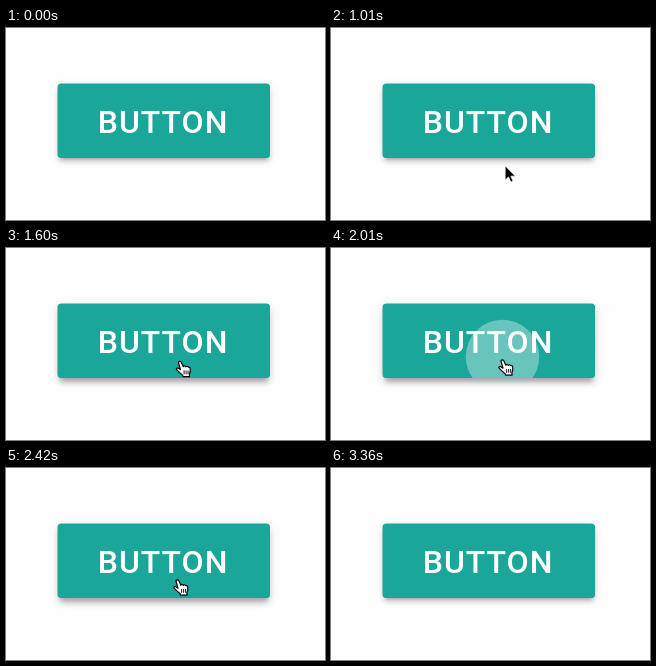
An HTML page that plays this animation: 319 px wide and 192 px high, repeating every 3.83 s.

```html
<!DOCTYPE html>
<html lang="en">
<head>
<meta charset="utf-8">
<title>Button ripple</title>
<style>
html, body { margin: 0; width: 100%; height: 100%; overflow: hidden; background: #fefefe; }
#stage { position: relative; width: 319px; height: 192px; overflow: hidden; }
#shadow { position: absolute; left: 52px; top: 56px; width: 212px; height: 74px; border-radius: 4px; background: #1ba69a; }
svg { position: absolute; left: 0; top: 0; display: block; }
text { font: 500 32px Roboto, sans-serif; letter-spacing: 1.04px; fill: #fff; }
</style>
</head>
<body>
<div id="stage">
  <div id="shadow"></div>
  <svg width="319" height="192" viewBox="0 0 319 192">
    <clipPath id="face"><rect x="51.5" y="55.5" width="212.5" height="74.5" rx="4"/></clipPath>
    <rect x="51.5" y="55.5" width="212.5" height="74.5" rx="4" fill="#1ba69a"/>
    <g clip-path="url(#face)"><circle id="ripple" cx="171.5" cy="108.5" r="0" fill="#fff"/></g>
    <text x="91.7" y="104.5">BUTTON</text>
    <path id="arrow" d="M0 0V14.5L3.4 11.4L5.6 16.4L8 15.4L5.8 10.5H10.4Z" fill="#000" stroke="#fff" stroke-width=".8"/>
    <g id="hand" stroke="#000" stroke-width="1.2" stroke-linejoin="round" stroke-linecap="round">
      <path fill="#fff" d="M3 2.2C2.8 .6 5 .2 5.8 1.8L7.8 6.2C8.6 5 9.9 5.4 10.2 6.4C11 5.3 12.3 5.7 12.6 6.7C13.6 6.2 14.6 6.9 14.7 8C15 10 15 11.8 13.9 13.6L14 16.2H7.6L7.2 14.8C5 13.2 3.4 11.4 1.2 9.3C.2 8 1.8 6.9 3.2 7.9L5 9.2Z"/>
      <path fill="none" stroke-width=".9" d="M8.6 10.4V13.4M10.6 10.4V13.4M12.6 10.4V13.4"/>
    </g>
  </svg>
</div>
<script>
const LOOP = 3830;
const BUTTON_BOTTOM = 130;
const ZOOM = 2.08;
const [shadow, ripple, arrow, hand] =
  ['shadow', 'ripple', 'arrow', 'hand'].map(id => document.getElementById(id));

const mix = (a, b, p) => a + (b - a) * p;
const clamp = p => Math.max(0, Math.min(1, p));

// Number of updates made so far in a run of evenly spaced ones.
function steps(t, start, end, count) {
  if (t < start) return 0;
  return Math.min(count, 1 + Math.floor((t - start) / (end - start) * (count - 1) + 0.01));
}

function cursorAt(t) {
  if (t < 720) return { x: 173, y: 200 };
  if (t < 1300) {
    const p = (steps(t, 720, 1240, 10) - 1) / 9;
    return { x: mix(173, 175, p), y: mix(125, 189, (1 - p) ** 2) };
  }
  if (t < 1540) {
    const p = steps(t, 1300, 1360, 2) / 2;
    return { x: mix(175, 172, p), y: mix(125, 117, p) };
  }
  if (t < 3020) {
    const p = steps(t, 1540, 1710, 4) / 4;
    return { x: mix(172, 167, p), y: mix(111, 117, (1 - p) ** 2) };
  }
  const k = steps(t, 3020, 3360, 7);
  return { x: 167 + k, y: 111 + 3.7 * k * k };
}

function hoverAt(t) {
  if (t < 2000) return clamp((steps(t, 720, 1240, 10) - 6) / 4);
  return clamp((7 - steps(t, 3020, 3360, 7)) / 4);
}

function setShadow(h) {
  const layer = (y, blur, spread, alpha) =>
    `0 ${y * ZOOM}px ${blur * ZOOM}px ${spread * ZOOM}px rgba(0,0,0,${alpha})`;
  shadow.style.boxShadow = [
    layer(mix(2, 2.5, h), mix(2, 3, h), 0, 0.14),
    layer(1, mix(5, 6, h), 0, 0.09),
    layer(3, mix(1, 2, h), mix(-2, -1.4, h), 0.2)
  ].join(',');
}

function draw(t) {
  const { x, y } = cursorAt(t);
  const over = y <= BUTTON_BOTTOM;
  const place = `translate(${x} ${y})`;
  hand.setAttribute('transform', place);
  arrow.setAttribute('transform', place);
  hand.style.display = over ? '' : 'none';
  arrow.style.display = over ? 'none' : '';

  const k = steps(t, 1950, 2250, 6);
  ripple.setAttribute('r', 9.2 * k * k);
  ripple.setAttribute('opacity', 0.38 * (1 - (k / 6) ** 2));

  setShadow(hoverAt(t));
}

const start = performance.now();
function tick() {
  draw((performance.now() - start) % LOOP);
  requestAnimationFrame(tick);
}
tick();
</script>
</body>
</html>
```
